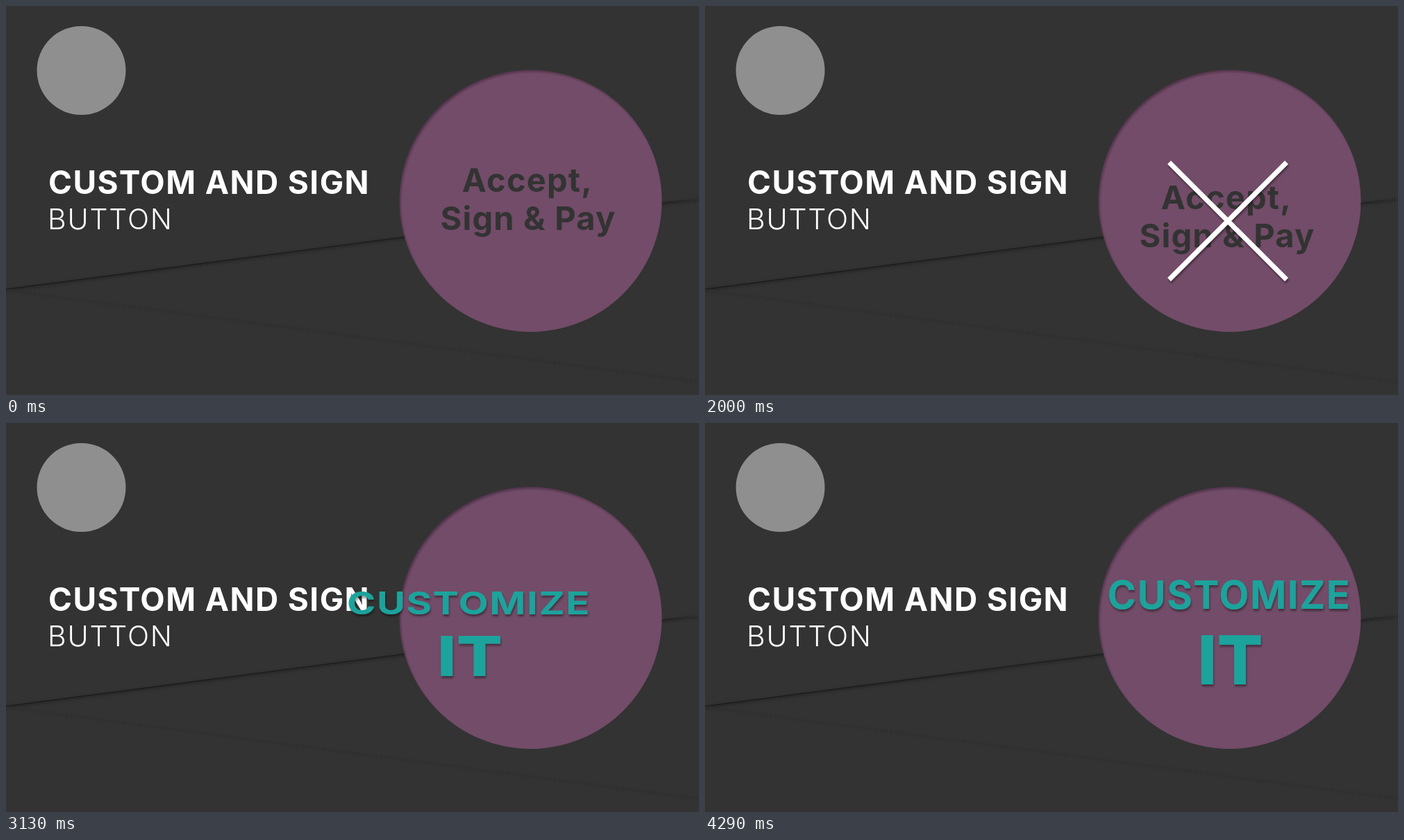
An HTML page for the animation above (4.5 s loop, 998 by 561 pixels).

```html
<!DOCTYPE html>
<html lang="en">
<head>
<meta charset="utf-8">
<title>Custom and sign button</title>
<style>
  html, body { margin: 0; width: 100%; height: 100%; overflow: hidden; background: #333; }
  svg { display: block; width: 100%; height: 100%; }
  text { font-family: Inter, "Open Sans", sans-serif; font-weight: 700; font-optical-sizing: none; }
  .centered { text-anchor: middle; }
  .light { font-weight: 350; }
  .heavy { font-weight: 800; }
</style>
</head>
<body>
<svg viewBox="0 0 998 561">
  <defs>
    <radialGradient id="disc" gradientUnits="userSpaceOnUse" cx="757.5" cy="284" r="192">
      <stop offset=".972" stop-color="#724c68"/>
      <stop offset="1" stop-color="#503249"/>
    </radialGradient>
    <linearGradient id="fold" gradientUnits="userSpaceOnUse" x1="0" y1="0" x2="998" y2="0">
      <stop offset="0" stop-color="#1c1c1c"/>
      <stop offset=".96" stop-color="#202020"/>
      <stop offset="1" stop-color="#333"/>
    </linearGradient>
    <linearGradient id="wipeEdge" gradientUnits="userSpaceOnUse" x1="0" y1="-13" x2="0" y2="13">
      <stop offset="0" stop-color="#000"/>
      <stop offset="1" stop-color="#fff"/>
    </linearGradient>
    <mask id="wipe" maskUnits="userSpaceOnUse" x="500" y="100" width="500" height="400">
      <rect x="500" y="100" width="500" height="400" fill="url(#wipeEdge)"/>
    </mask>
    <filter id="soft" filterUnits="userSpaceOnUse" x="-20" y="250" width="1040" height="311">
      <feGaussianBlur stdDeviation="1.5"/>
    </filter>
    <filter id="shadow" filterUnits="userSpaceOnUse" x="0" y="0" width="998" height="561">
      <feDropShadow dx="1" dy="3" stdDeviation="1.6" flood-color="#000" flood-opacity=".4"/>
    </filter>
  </defs>

  <rect width="998" height="561" fill="#333"/>
  <g fill="none">
    <path d="M0 410L998 279" stroke="#292929" stroke-width="5" filter="url(#soft)"/>
    <path d="M0 408.5L998 277.5" stroke="url(#fold)" stroke-width="1.6"/>
    <path d="M0 410L998 542" stroke="#2e2e2e" stroke-width="3" filter="url(#soft)"/>
  </g>
  <circle cx="108.5" cy="93" r="64" fill="#8f8f8f"/>
  <text x="61" y="271" font-size="46" letter-spacing="1.4" fill="#fff">CUSTOM AND SIGN</text>
  <text class="light" x="60" y="322" font-size="41" letter-spacing="1.8" fill="#fff">BUTTON</text>
  <circle cx="755.5" cy="281" r="189" fill="url(#disc)"/>

  <g id="label" class="centered" font-size="47" letter-spacing="1.2" fill="#333">
    <text x="751" y="268">Accept,</text>
    <text x="752" y="323">Sign &amp; Pay</text>
  </g>
  <g id="crossLayer" filter="url(#shadow)">
    <path id="cross" d="M-84.5-84.5L84.5 84.5M-84.5 84.5L84.5-84.5" stroke="#fff" stroke-width="7"/>
  </g>
  <g filter="url(#shadow)">
    <g id="slogan" class="centered" fill="#1fa39c" mask="url(#wipe)">
      <text x="755" y="268" font-size="56" letter-spacing="1.6">CUSTOMIZE</text>
      <text class="heavy" x="756.5" y="377" font-size="98">IT</text>
    </g>
  </g>
</svg>
<script>
const LOOP = 4500, STEP = 40;
const FLY_START = 1960, FLY_END = 2440, BOUNCE_SHOWN = 2690, BOUNCE_START = 2468, LAST_CHANGE = 4290;
const WIDTH = 998, HEIGHT = 561, PIVOT_Y = 320;
const byId = id => document.getElementById(id);
const [label, crossLayer, cross, slogan, wipeEdge] =
  ["label", "crossLayer", "cross", "slogan", "wipeEdge"].map(byId);
const clamp = v => Math.min(1, Math.max(0, v));

// Piecewise linear curve through [x, y] points.
function curve(points, x) {
  for (let i = 1; i < points.length; i++) {
    const [x0, y0] = points[i - 1], [x1, y1] = points[i];
    if (x <= x1) return y0 + (y1 - y0) * (x - x0) / (x1 - x0);
  }
  return 1;
}

const DRIFT = [[0, 0], [.14, .36], [.43, .73], [.71, .91], [1, 1]];
const FALL = [[0, 0], [.25, .07], [.5, .2], [.75, .467], [1, 1]];
const HOP = [[0, 0], [.125, .2665], [.25, .4], [.375, .465], [.5, .5],
             [.625, .535], [.75, .6], [.875, .7335], [1, 1]];
const HOPS = [[664, 664, 9], [1324, 332, 27], [1656, 164, 81]]; // start, duration, divisor
const SQUASHES = [[650, .6], [1312, .8], [1642, .9]];           // start, scale

function bounceHeight(t) {
  if (t < 664) return HEIGHT / 3 * Math.sin(Math.PI * (.5 + curve(FALL, t / 664) / 2));
  let height = 0;
  for (const [start, duration, divisor] of HOPS)
    if (t >= start && t < start + duration)
      height = HEIGHT / divisor * Math.sin(Math.PI * curve(HOP, (t - start) / duration));
  return height;
}

// Constant speed for the first half, then slowing to a stop.
const settle = p => p < .5 ? p * 4 / 3 : 1 - (1 - p) ** 2 * 4 / 3;

function squash(t) {
  let scale = 1;
  for (const [start, low] of SQUASHES) {
    const down = clamp((t - start) / 26), up = settle(clamp((t - start - 26) / 166));
    scale *= 1 - (1 - low) * (down - up);
  }
  return scale;
}

function held(t) {
  const base = t < BOUNCE_SHOWN ? 0 : BOUNCE_SHOWN;
  return Math.min(LAST_CHANGE, base + Math.floor((t - base) / STEP) * STEP);
}

const show = (el, visible) => el.setAttribute("visibility", visible ? "visible" : "hidden");

function draw(time) {
  const t = held(time);
  const grow = clamp(t / 1000);
  const fly = t < FLY_START + STEP ? 0 : (t - FLY_START) / 500;
  show(label, t < FLY_END);
  show(crossLayer, t > 0 && t < FLY_END);
  label.setAttribute("transform", `translate(0 ${316 * fly})`);
  cross.setAttribute("transform",
    `translate(753 ${280.5 + 369 * fly}) rotate(${90 * (1 - grow)}) scale(${grow})`);
  cross.setAttribute("opacity", grow);

  show(slogan, t >= BOUNCE_SHOWN);
  const b = Math.max(0, t - BOUNCE_START);
  const dx = WIDTH / 4 * (curve(DRIFT, clamp(b / 1822)) - 1);
  slogan.setAttribute("transform",
    `translate(${dx} ${PIVOT_Y - bounceHeight(b)}) scale(1 ${squash(b)}) translate(0 ${-PIVOT_Y})`);
  wipeEdge.setAttribute("gradientTransform", `translate(0 ${496 - 320 * clamp(b / 580)})`);
}

function tick() {
  draw(performance.now() % LOOP);
  requestAnimationFrame(tick);
}
tick();
</script>
</body>
</html>
```
